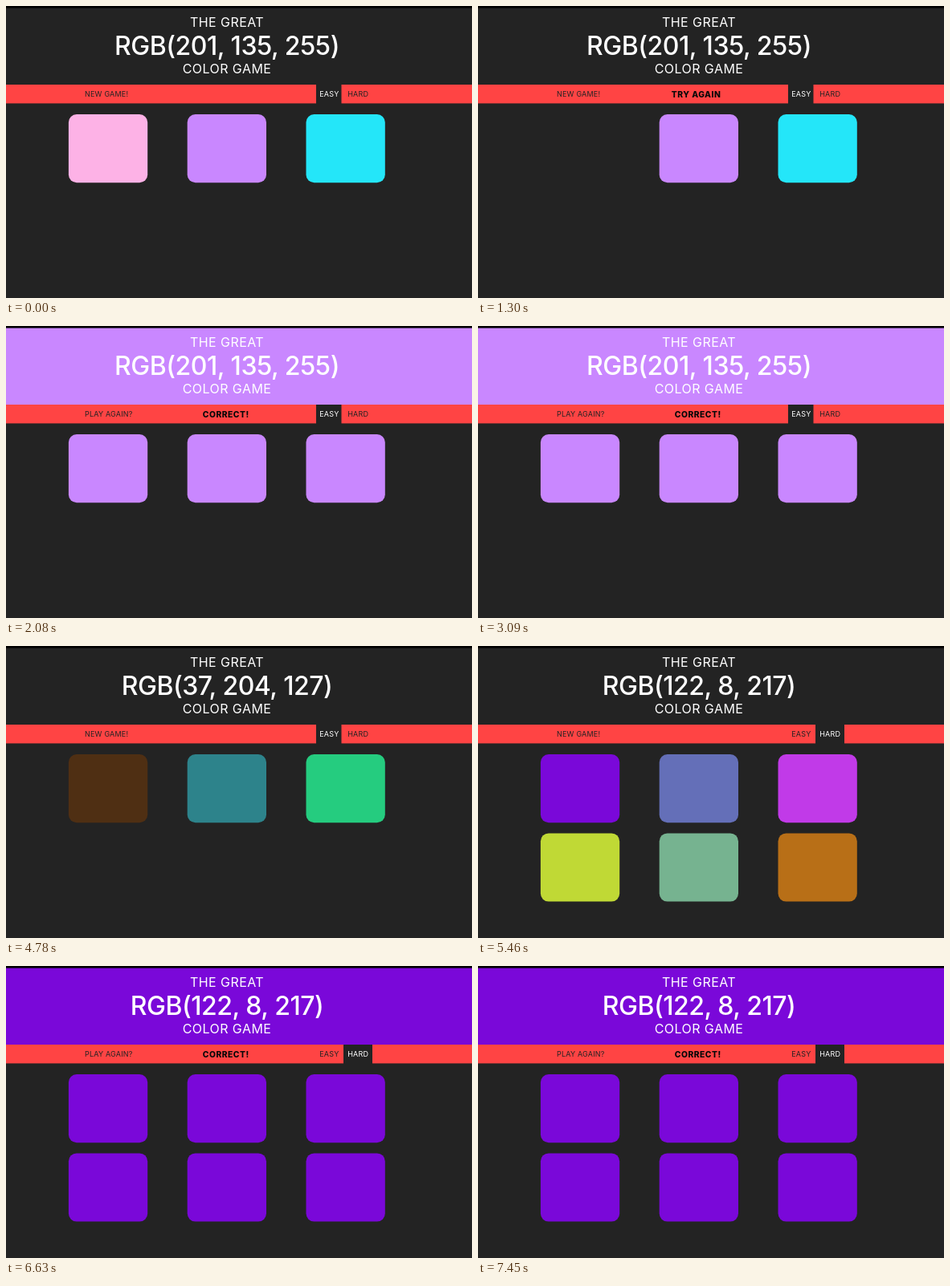
Write an HTML page that moves like this. It is 580 by 364 pixels and loops after 8 s.

```html
<!DOCTYPE html>
<html lang="en">
<head>
<meta charset="utf-8">
<title>Color Game</title>
<style>
  html, body { margin: 0; width: 100%; height: 100%; overflow: hidden; background: #232323; }
  svg { display: block; width: 580px; height: 364px; font-family: Inter, sans-serif; }
  .title { fill: #fff; font-size: 16px; letter-spacing: .45px; text-anchor: middle; }
  #goal { font-size: 32px; font-weight: 500; letter-spacing: -.5px; }
  .nav { fill: #232323; font-size: 9px; letter-spacing: .2px; }
  .nav.on { fill: #fff; }
  #message { fill: #080808; font-size: 10.3px; font-weight: 800; letter-spacing: .5px; text-anchor: middle; }
</style>
</head>
<body>
<svg viewBox="0 0 580 364">
  <rect width="580" height="364" fill="#232323"/>
  <rect id="header" width="580" height="98"/>
  <rect width="580" height="2.6"/>
  <text class="title" x="275" y="26">THE GREAT</text>
  <text class="title" id="goal" x="275" y="60.7"></text>
  <text class="title" x="275" y="83.5">COLOR GAME</text>
  <rect y="98" width="580" height="23.4" fill="#ff4444"/>
  <rect id="selected" y="98" height="24" fill="#232323"/>
  <text class="nav" id="reset" x="98" y="113.2"></text>
  <text id="message" x="273" y="113.7"></text>
  <text class="nav" id="easy" x="390.2" y="113.2">EASY</text>
  <text class="nav" id="hard" x="425.2" y="113.2">HARD</text>
  <g id="squares"></g>
</svg>
<script>
const LOOP = 8000;
const DARK = '#232323';
const el = id => document.getElementById(id);

const PURPLE = 'rgb(201, 135, 255)';
const GREEN = 'rgb(37, 204, 127)';
const VIOLET = 'rgb(122, 8, 217)';
const CYAN = '#24e6f9';

const states = [
  { at: 0, goal: PURPLE, colors: ['#fdb2e6', PURPLE, CYAN] },
  { at: 1300, goal: PURPLE, colors: [null, PURPLE, CYAN], message: 'TRY AGAIN' },
  { at: 2080, goal: PURPLE, colors: Array(3).fill(PURPLE), won: true },
  { at: 3770, goal: GREEN, colors: ['#4f2f13', '#2d838b', GREEN] },
  { at: 5460, goal: VIOLET,
    colors: [VIOLET, '#646fb8', '#c13ae8', '#c0d935', '#76b390', '#b86f17'] },
  { at: 6630, goal: VIOLET, colors: Array(6).fill(VIOLET), won: true }
];

const squares = Array.from({ length: 6 }, (_, i) => {
  const square = document.createElementNS('http://www.w3.org/2000/svg', 'rect');
  const box = { x: 77.9 + 147.8 * (i % 3), y: 135 + 98.4 * Math.floor(i / 3), width: 98.3, height: 85.2, rx: 10 };
  for (const name in box) square.setAttribute(name, box[name]);
  return el('squares').appendChild(square);
});

function show({ goal, colors, message = '', won = false }) {
  const hard = colors.length === 6;
  el('goal').textContent = goal.toUpperCase();
  el('header').setAttribute('fill', won ? goal : DARK);
  el('reset').textContent = won ? 'PLAY AGAIN?' : 'NEW GAME!';
  el('message').textContent = won ? 'CORRECT!' : message;
  el('message').setAttribute('x', won ? 273.7 : 271.5);
  el('selected').setAttribute('x', hard ? 420 : 386);
  el('selected').setAttribute('width', hard ? 36 : 31.5);
  el('easy').classList.toggle('on', !hard);
  el('hard').classList.toggle('on', hard);
  squares.forEach((square, i) => square.setAttribute('fill', colors[i] || 'none'));
}

let current;
function frame() {
  const time = performance.now() % LOOP;
  const state = states.findLast(s => s.at <= time);
  if (state !== current) show(current = state);
  requestAnimationFrame(frame);
}
frame();
</script>
</body>
</html>
```
